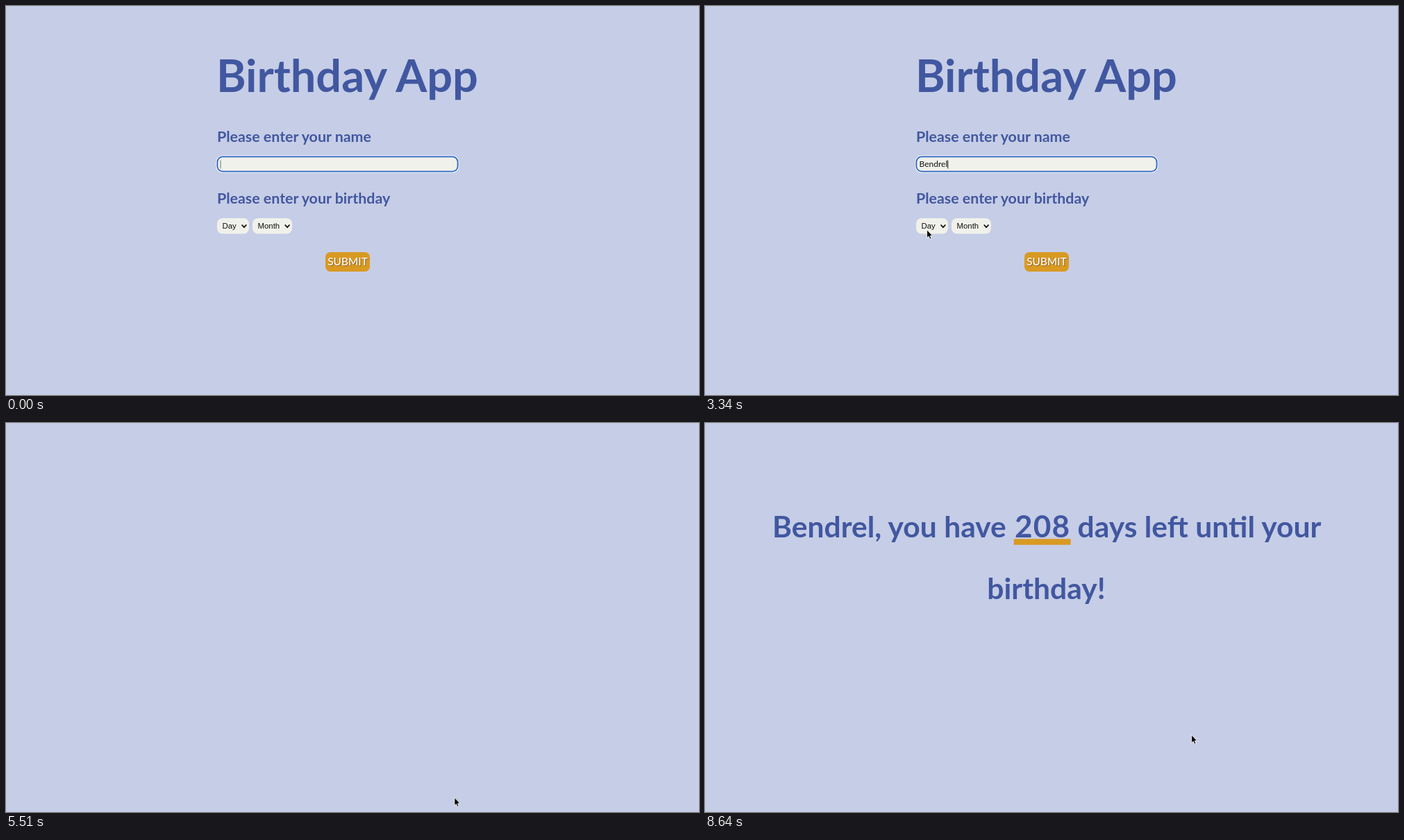
Animation of 998 by 561 pixels, one loop 8890 ms. Source, as an HTML page:

```html
<!DOCTYPE html>
<html lang="en">
<head>
<meta charset="utf-8">
<title>Birthday App</title>
<style>
  html, body { margin: 0; width: 100%; height: 100%; overflow: hidden; background: #c6cde6; }
  svg { display: block; width: 998px; height: 561px; }
  text { font-family: Lato, sans-serif; white-space: pre; }

  .heading { fill: #4157a0; font-weight: 700; }
  .title { font-size: 64.8px; }
  .label { font-size: 21.4px; }
  .message { font-size: 42.6px; }
  .middle { text-anchor: middle; }
  .number { font-size: 44.2px; letter-spacing: 1.2px; }
  .amber { fill: #d99a22; }
  .field { fill: #f0f1ea; }
  .ring rect { fill: none; }
  .ring .halo { stroke: #fff; stroke-width: 1.2; }
  .ring .line { stroke: #2c66c2; stroke-width: 1.8; }
  .typed { font-size: 12px; fill: #111; }
  .choice { font: 11.4px "Liberation Sans", Arial, sans-serif; fill: #111; }
  .chevron, .check { fill: none; stroke: #111; stroke-width: 1.8; }
  .check { stroke-width: 1.5; stroke-linecap: round; }
  .submit { font-size: 15.4px; font-weight: 500; fill: #fff; text-shadow: 1px 1px 1px rgba(70, 50, 60, .55); }

  .menu { filter: drop-shadow(0 2px 5px rgba(30, 30, 60, .42)); }
  .panel { fill: #e1dee5; stroke: #bdbbc7; stroke-width: .6; }
  .bar { fill: #c8c5cc; }
  .menu text { font: 11px Inter, sans-serif; fill: #28272b; }
  .menu text.over { fill: #fff; }

  #form, #result, #pulse, #caret, #cursor { animation: 8890ms linear infinite; }
  #form { animation-name: leave; }
  #result { animation-name: arrive; }
  #pulse { animation-name: pulse; animation-timing-function: ease-in-out; transform-origin: 485.6px 151.5px; }
  #caret { animation-name: blink; }
  #cursor { animation-name: roam; animation-timing-function: ease-in-out; }

  @keyframes leave {
    0%, 57.8% { opacity: 1; }
    62%, 100% { opacity: 0; }
  }
  @keyframes arrive {
    0% { opacity: 0; }
    64.3% { opacity: 0; animation-timing-function: ease; }
    70.75%, 100% { opacity: 1; }
  }
  @keyframes pulse {
    0%, 65.1% { transform: scale(1); }
    70.75% { transform: scale(1.36); }
    76.4%, 100% { transform: scale(1); }
  }
  @keyframes blink {
    0% { opacity: .6; }
    .9%, 4.3% { opacity: 1; }
    7.1%, 11.2% { opacity: 0; }
    12.2%, 100% { opacity: 1; }
  }
  @keyframes roam {
    0%, 32.6% { transform: translate(352px, 562px); opacity: 1; }
    37.1%, 39.1% { transform: translate(319px, 322px); }
    42.7%, 43.4% { transform: translate(325px, 369px); }
    46%, 47.7% { transform: translate(384px, 314px); }
    50.8%, 52% { transform: translate(386px, 404px); }
    56.2%, 58% { transform: translate(511px, 362px); }
    60.6% { transform: translate(645px, 539px); }
    68.5%, 73.59% { transform: translate(647px, 543px); opacity: 1; }
    73.6% { transform: translate(778px, 463px); opacity: 0; }
    90.09% { transform: translate(778px, 463px); opacity: 0; }
    90.1% { transform: translate(778px, 463px); opacity: 1; }
    93.3% { transform: translate(703px, 451px); }
    97.2%, 100% { transform: translate(700px, 449px); opacity: 1; }
  }
</style>
</head>
<body>
<svg viewBox="0 0 998 561">
  <g id="form">
    <text class="heading title" x="303" y="124">Birthday App</text>
    <text class="heading label" x="304" y="195.5">Please enter your name</text>
    <rect class="field" x="304" y="217" width="347" height="22" rx="8"/>
    <g class="ring" id="nameRing"></g>
    <text class="typed" id="name" x="308.5" y="231.5"></text>
    <g id="caretBox"><rect id="caret" x="0" y="222.5" width="1" height="12" fill="#222"/></g>

    <text class="heading label" x="304" y="284.5">Please enter your birthday</text>
    <rect class="field" x="304" y="306" width="46" height="22.5" rx="8"/>
    <rect class="field" x="355" y="306" width="57" height="22.5" rx="8"/>
    <g class="ring" id="dayRing"></g>
    <g class="ring" id="monthRing"></g>
    <text class="choice" id="day" x="311.5" y="321"></text>
    <text class="choice" id="month" x="362.5" y="321"></text>
    <path class="chevron" d="M339.5 315.5l3.4 3.7 3.4-3.7M401.7 315.5l3.4 3.7 3.4-3.7"/>

    <rect class="amber" x="460" y="355" width="64" height="28" rx="7"/>
    <text class="submit middle" x="492" y="373.7">SUBMIT</text>
  </g>

  <g id="result">
    <text class="heading message" id="greeting" x="97" y="164.5"></text>
    <g id="pulse">
      <text class="heading number middle" x="486.2" y="164.5">208</text>
      <rect class="amber" x="444.8" y="167.2" width="81.8" height="8.5"/>
    </g>
    <text class="heading message" x="536.5" y="164.5">days left until your</text>
    <text class="heading message middle" x="491.5" y="253.5">birthday!</text>
  </g>

  <g class="menu" id="dayMenu"></g>
  <g class="menu" id="monthMenu"></g>

  <g id="cursor">
    <path d="M.6 .8V12.6L3.2 10.2 5 14.2 7 13.3 5.3 9.4H8.8Z" fill="#000" stroke="#fff" stroke-width=".9" stroke-linejoin="round"/>
  </g>
</svg>
<script>
const LOOP = 8890;
const ROW = 18.5;
const NAME = "Bendrel";
const KEY_TIMES = [1600, 1840, 1940, 2090, 2390, 2490, 2740];
const DAYS = ["Day", ...Array.from({ length: 31 }, (_, i) => i + 1)];
const MONTHS = "Month Jan Feb Mar Apr May Jun Jul Aug Sep Oct Nov Dec".split(" ");

const $ = id => document.getElementById(id);
const between = (t, a, b) => t >= a && t < b;
const show = (el, on) => el.setAttribute("visibility", on ? "visible" : "hidden");
const smooth = (t, a, b) => {
  const p = Math.min(1, Math.max(0, (t - a) / (b - a)));
  return p * p * (3 - 2 * p);
};

function addRing(id, x, y, w, h) {
  const rect = (name, grow) =>
    `<rect class="${name}" x="${x - grow}" y="${y - grow}" width="${w + 2 * grow}" height="${h + 2 * grow}" rx="${8 + grow}"/>`;
  $(id).innerHTML = rect("halo", .8) + rect("line", -.4);
}

function addMenu(id, x, width, items) {
  const rows = items.map((item, i) => `<text x="${x + 20}" y="${321.3 + i * ROW}">${item}</text>`);
  $(id).innerHTML =
    `<rect class="panel" x="${x}" y="304" width="${width}" height="${items.length * ROW + 7.5}" rx="6"/>
     <rect class="bar" x="${x + 4}" y="308" width="${width - 8}" height="18.5" rx="3.5"/>
     <path class="check" d="M${x + 8.5} 318l2.6 3.2 4.6-7.4"/>` + rows.join("");
}

function drawMenu(id, open, row) {
  const menu = $(id);
  show(menu, open);
  menu.querySelector(".bar").setAttribute("y", 308 + row * ROW);
  menu.querySelectorAll("text").forEach((el, i) => el.classList.toggle("over", i === row));
}

function draw(t) {
  const field = $("name");
  field.textContent = NAME.slice(0, KEY_TIMES.filter(k => k <= t).length);
  const end = field.textContent ? field.getComputedTextLength() : 0;
  $("caretBox").setAttribute("transform", `translate(${308.5 + end} 0)`);
  show($("caretBox"), t < 3480);

  $("day").textContent = t < 3840 ? "Day" : "3";
  $("month").textContent = t < 4600 ? "Month" : "May";
  show($("nameRing"), t < 3480);
  show($("dayRing"), between(t, 3480, 4140));
  show($("monthRing"), t >= 4140);

  drawMenu("dayMenu", between(t, 3480, 3840), Math.round(3 * smooth(t, 3480, 3800)));
  drawMenu("monthMenu", between(t, 4140, 4600), Math.round(5 * smooth(t, 4240, 4520)));
}

addRing("nameRing", 304, 217, 347, 22);
addRing("dayRing", 304, 306, 46, 22.5);
addRing("monthRing", 355, 306, 57, 22.5);
addMenu("dayMenu", 298, 54, DAYS);
addMenu("monthMenu", 348, 66, MONTHS);
$("greeting").textContent = `${NAME}, you have`;

const start = performance.now();
function tick() {
  draw((performance.now() - start) % LOOP);
  requestAnimationFrame(tick);
}
tick();
</script>
</body>
</html>
```
